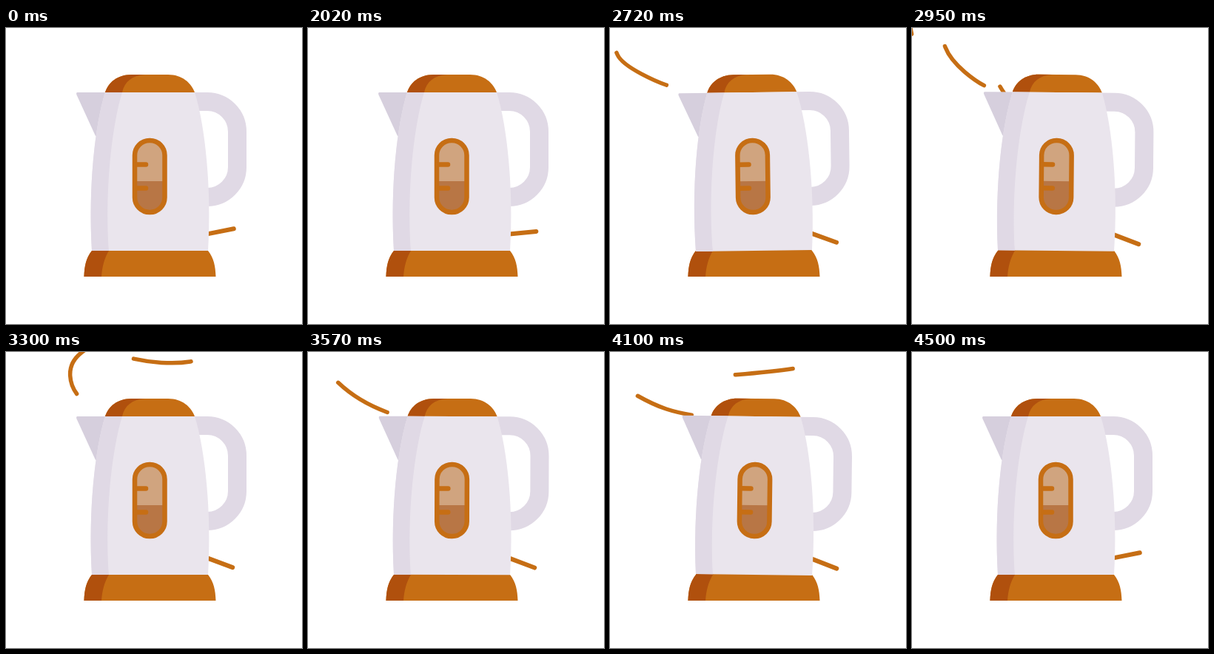
Write an HTML page that moves like this. It is 400 px wide and 400 px high and loops after 5.02 s.

```html
<!DOCTYPE html>
<html lang="en">
<head>
<meta charset="utf-8">
<title>Kettle</title>
<style>
  html, body { margin: 0; width: 100%; height: 100%; overflow: hidden; background: #fff; }
  svg { display: block; width: 100%; height: 100%; }
  .line { fill: none; stroke: #c66e14; stroke-linecap: round; }
  .main { fill: #c66e14; }
  .dark { fill: #b0500d; }
  .light { fill: #eae5ed; }
  .shade { fill: #e0d9e5; }
</style>
</head>
<body>
<svg viewBox="0 0 400 400">
  <g id="steam" class="line" stroke-width="5.5"></g>

  <path class="main" d="M117 299.5H272L273 301C281 311 283 322 283.5 336H105.5C106 322 108 311 116 301Z"/>
  <path class="dark" d="M117 299.5H140L139 301C133 311 130 322 129 336H105.5C106 322 108 311 116 301Z"/>

  <g id="kettle">
    <path id="lever" class="line" stroke-width="6" d="M272 278.4H308.5"/>
    <path fill="none" stroke="#e0d9e5" stroke-width="25" d="M250 99.5H272A40.5 40.5 0 0 1 312.5 140V188A40.5 40.5 0 0 1 272 228.5H265"/>
    <path fill="#d6cfdd" d="M96.500 87H140V146H121L95.300 90Q94.500 87 96.500 87Z"/>
    <path class="main" d="M134 87C138 74 150 63 170 63H219C238 63 250 74 255 87Z"/>
    <path class="dark" d="M134 87C138 74 150 63 170 63H188C170 64 160 73 157 87Z"/>
    <path class="light" d="M134 87C120 132 111 215 116 301H273C278 215 269 132 255 87Z"/>
    <path class="shade" d="M134 87C120 132 111 215 116 301H139C133 210 145 125 157 87Z"/>

    <rect x="174" y="152" width="40.500" height="97" rx="20" fill="#d0a47f"/>
    <path fill="#b87645" d="M174 207H214.500V229A20 20 0 0 1 194.500 249H194A20 20 0 0 1 174 229Z"/>
    <g class="line" stroke-width="6.500">
      <rect x="174" y="152" width="40.500" height="97" rx="20"/>
      <path d="M175 184.500H189M175 216.500H189"/>
    </g>
  </g>
</svg>
<script>
const LOOP = 5020, BOIL = 2473, END = 4500;
const UP = -11.2, DOWN = 20.5;

const wide = 'M123 87C100 84 85 80 76 77S18 54 10 36S0 14 -3 -6';

// path, start (ms), speed (px/ms), length (px)
const puffs = [
  [wide, 2448, 0.475, 82],
  ['M124 87C115 85 106 82 98 78S55 52 45 26C41 16 40 6 40 -8', 2742, 0.5, 76],
  ['M124 87C112 70 106 50 116 32S150 4 172 9S225 17 249 13S300 2 315 -8', 2934, 0.55, 78],
  ['M124 87C115 76 103 66 96 57S76 20 103 0S140 -28 150 -30', 3075, 0.53, 78],
  ['M124 87C100 80 60 65 30 30S12 8 9 -8', 3390, 0.53, 78],
  ['M117 87C108 76 100 68 103 57S116 40 126 36S200 30 250 22S340 14 368 -8', 3745, 0.53, 78],
  [wide, 3930, 0.53, 78]
].map(([d, start, speed, size]) => {
  const el = document.createElementNS('http://www.w3.org/2000/svg', 'path');
  el.setAttribute('d', d);
  document.getElementById('steam').append(el);
  return { el, start, speed, size, total: el.getTotalLength() };
});

const kettle = document.getElementById('kettle');
const lever = document.getElementById('lever');
const clamp = x => Math.min(1, Math.max(0, x));
const easeOut = x => 1 - (1 - x) ** 2;
const easeInOut = x => x * x * (3 - 2 * x);
const turn = (el, angle, x, y) => el.setAttribute('transform', `rotate(${angle} ${x} ${y})`);

function drawPuff({ el, start, speed, size, total }, t) {
  const head = (t - start) * speed;
  const from = Math.max(0, head - size), to = Math.min(head, total);
  const visible = t < END && to > from;
  el.style.display = visible ? '' : 'none';
  if (!visible) return;
  el.style.strokeDasharray = `${to - from} 2000`;
  el.style.strokeDashoffset = -from;
}

function draw(t) {
  const press = t < 2020 ? 0 : easeOut(clamp((t - 1995) / 275));
  const release = easeInOut(clamp((t - 4225) / 275));
  turn(lever, UP + (DOWN - UP) * (press - release), 272, 278.4);

  const boiling = t > BOIL && t < END - 3;
  turn(kettle, boiling ? -0.88 * Math.sin(2 * Math.PI * (t - BOIL) / 184) : 0, 194.5, 301);

  puffs.forEach(p => drawPuff(p, t));
}

const origin = performance.now();
function tick() {
  draw((performance.now() - origin) % LOOP);
  requestAnimationFrame(tick);
}
tick();
</script>
</body>
</html>
```
